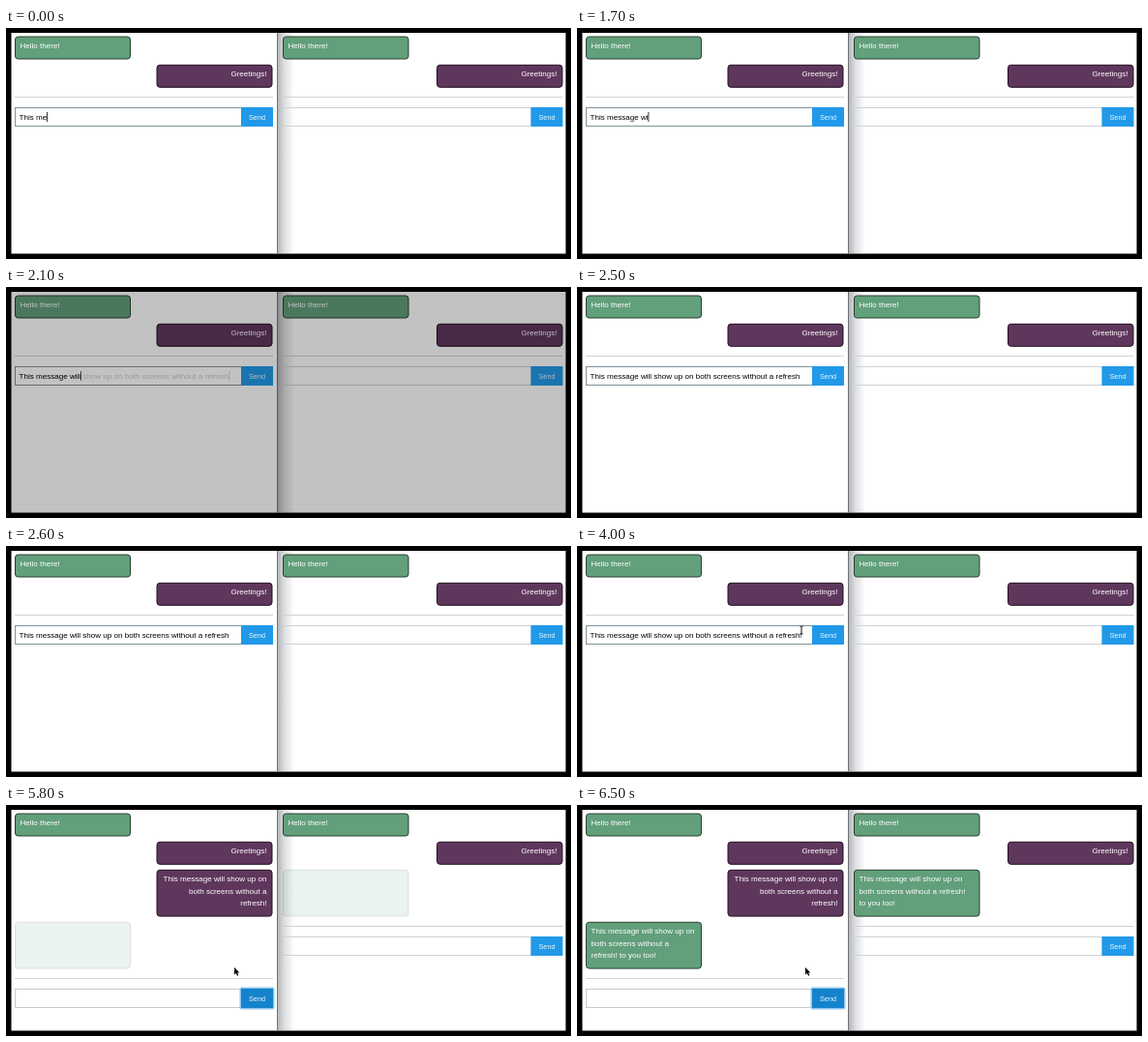
Recreate the animation shown at these times as an HTML page with a canvas. Size 584 by 239 pixels, loop 8000 ms.

```html
<!DOCTYPE html>
<html lang="en">
<head>
<meta charset="utf-8">
<title>Chat on two screens</title>
<style>
  html, body { margin: 0; width: 100%; height: 100%; overflow: hidden; background: #000; }
  canvas { display: block; width: 584px; height: 239px; }
</style>
</head>
<body>
<canvas id="stage" width="584" height="239"></canvas>
<script>
const W = 584, H = 239, LOOP = 8000;
const GREEN = '#629f7b', PURPLE = '#5f375d';
const FONT = '"Liberation Sans", Arial, sans-serif';
const MESSAGE = 'This message will show up on both screens without a refresh!';
const SENT = ['This message will show up on', 'both screens without a', 'refresh!'];
const REPLY_LEFT = ['This message will show up on', 'both screens without a', 'refresh! to you too!'];
const REPLY_RIGHT = ['This message will show up on', 'both screens without a refresh!', 'to you too!'];

// [time, characters typed]
const TYPING = [[0, 7], [300, 8], [600, 9], [700, 10], [900, 11],
  [1100, 12], [1200, 13], [1400, 14], [1700, 15]];
const FADE = { start: 1900, length: 500 };
const CLICK = 4500, SENT_AT = 5000, REPLY_AT = 5700, APPEAR = 800;

// [time, x, y]
const POINTER = [[3300, 119, 66], [3700, 184, 79], [4000, 232, 87], [4100, 254, 95],
  [4300, 261, 94], [5000, 259, 95], [5300, 251, 128], [5700, 236, 168]];

const clamp = v => Math.max(0, Math.min(1, v));
const stage = document.getElementById('stage').getContext('2d');

function layer() {
  const c = document.createElement('canvas');
  c.width = W;
  c.height = H;
  return c.getContext('2d');
}
const before = layer(), after = layer();

function text(g, str, x, y, color, size = 8.05, align = 'left') {
  g.font = size + 'px ' + FONT;
  g.textAlign = align;
  g.fillStyle = color;
  g.fillText(str, x, y);
}

function bubble(g, x, y, w, lines, color, alpha = 1) {
  if (alpha <= 0) return;
  const right = color === PURPLE;
  g.globalAlpha = alpha;
  g.beginPath();
  g.roundRect(x + .5, y + .5, w - 1, lines.length * 12.4 + 10.6, 3);
  g.fillStyle = color;
  g.fill();
  g.lineWidth = 1;
  g.strokeStyle = right ? '#1f101f' : '#28402f';
  g.stroke();
  lines.forEach((line, i) =>
    text(g, line, right ? x + w - 6 : x + 5.5, y + 12.2 + i * 12.5, '#fff', 8.05, right ? 'right' : 'left'));
  g.globalAlpha = 1;
}

function form(g, x, w, y, border, focused) {
  const bw = 33, bx = x + w - bw;
  g.fillStyle = '#d2d2d4';
  g.fillRect(x, y, w, 1);
  g.lineWidth = 1;
  g.strokeStyle = border;
  g.strokeRect(x + .5, y + 11.5, w - bw, 19);
  if (focused) {
    g.fillStyle = '#8fc3ef';
    g.beginPath();
    g.roundRect(bx - 1.5, y + 9.5, bw + 3, 23, 2);
    g.fill();
  }
  g.fillStyle = focused ? '#1583cb' : '#2199e8';
  g.fillRect(bx, y + 11, bw, 20);
  text(g, 'Send', bx + bw / 2, y + 23.8, '#eef7fe', 7.3, 'center');
}

function shadow(g) {
  const grad = g.createLinearGradient(281, 0, 298, 0);
  grad.addColorStop(0, 'rgba(50,55,65,.36)');
  grad.addColorStop(.4, 'rgba(50,55,65,.16)');
  grad.addColorStop(1, 'rgba(50,55,65,0)');
  g.fillStyle = grad;
  g.fillRect(281, 5, 17, 228.5);
  g.fillStyle = '#6d7378';
  g.fillRect(280, 5, 1, 228.5);
}

function scene(g, s) {
  g.fillStyle = '#000';
  g.fillRect(0, 0, W, H);
  g.fillStyle = '#fff';
  g.fillRect(5.5, 5, 573, 228.5);
  shadow(g);

  bubble(g, 9, 8.5, 120, ['Hello there!'], GREEN);
  bubble(g, 286, 8.5, 130.5, ['Hello there!'], GREEN);
  bubble(g, 155.5, 37.8, 120, ['Greetings!'], PURPLE);
  bubble(g, 445, 37.8, 130.5, ['Greetings!'], PURPLE);
  bubble(g, 155.5, 66.8, 120, SENT, PURPLE, s.sent);
  bubble(g, 9, 120.8, 120, REPLY_LEFT, GREEN, s.reply);
  bubble(g, 286, 66.8, 130.5, REPLY_RIGHT, GREEN, s.reply);

  form(g, 9, 267, s.leftY, s.focused ? '#cacaca' : '#84929c', s.focused);
  form(g, 286, 289.5, s.rightY, '#cdd3d9', false);

  if (s.typed) {
    text(g, s.typed, 13.6, s.leftY + 24, '#000');
    if (s.caret) g.fillRect(13.6 + g.measureText(s.typed).width, s.leftY + 16, .8, 10);
  }
}

function typedAt(t) {
  const step = TYPING.filter(k => k[0] <= t).pop();
  return MESSAGE.slice(0, step[1]);
}

function state(t, late) {
  const s = { typed: '', caret: false, focused: t >= CLICK, sent: 0, reply: 0, leftY: 71, rightY: 71 };
  if (!late) {
    s.typed = t >= FADE.start + 100 ? MESSAGE.slice(0, 17) : typedAt(t);
    s.caret = true;
  } else if (t < SENT_AT) {
    s.typed = t < 2700 ? MESSAGE.slice(0, -1) : MESSAGE;
    s.caret = t < 2500 || (t >= 2700 && t < 3300);
  }
  if (t >= SENT_AT) {
    s.sent = clamp((t - SENT_AT) / APPEAR);
    s.leftY = 125;
  }
  if (t >= REPLY_AT) {
    s.reply = clamp((t - REPLY_AT) / APPEAR);
    s.leftY = 179;
    s.rightY = 125;
  }
  return s;
}

function pointerAt(t) {
  const i = POINTER.findIndex(k => k[0] > t);
  if (i < 0) return POINTER[POINTER.length - 1].slice(1);
  const [t0, x0, y0] = POINTER[i - 1], [t1, x1, y1] = POINTER[i];
  const k = (t - t0) / (t1 - t0);
  return [x0 + (x1 - x0) * k, y0 + (y1 - y0) * k];
}

const ARROW = new Path2D('M0 0V7.6L1.8 6L3 8.8L4.3 8.2L3.1 5.5H5.4Z');
const BEAM = new Path2D('M-1.6 -4H-.5L0 -3.5L.5 -4H1.6M0 -3.5V3.5M-1.6 4H-.5L0 3.5L.5 4H1.6');

function pointer(g, t) {
  if (t < POINTER[0][0]) return;
  const [x, y] = pointerAt(t);
  const overInput = t < SENT_AT && y > 82 && y < 102 && x < 243;
  g.save();
  g.translate(x, y);
  if (overInput) {
    g.lineWidth = 1;
    g.strokeStyle = '#111';
    g.stroke(BEAM);
  } else {
    g.lineWidth = 1.2;
    g.strokeStyle = '#fff';
    g.stroke(ARROW);
    g.fillStyle = '#000';
    g.fill(ARROW);
  }
  g.restore();
}

function draw(t) {
  const mix = clamp((t - FADE.start) / FADE.length);
  if (mix > 0 && mix < 1) {
    // the outgoing shot lies over the incoming one, both part transparent on black
    scene(before, state(t, false));
    scene(after, state(t, true));
    stage.fillStyle = '#000';
    stage.fillRect(0, 0, W, H);
    stage.globalAlpha = mix;
    stage.drawImage(after.canvas, 0, 0);
    stage.globalAlpha = 1 - mix;
    stage.drawImage(before.canvas, 0, 0);
    stage.globalAlpha = 1;
  } else {
    scene(stage, state(t, mix === 1));
  }
  pointer(stage, t);
}

const start = performance.now();
function tick() {
  const t = (performance.now() - start) % LOOP;
  draw(Math.floor(t / 100) * 100);
  requestAnimationFrame(tick);
}
tick();
</script>
</body>
</html>
```
